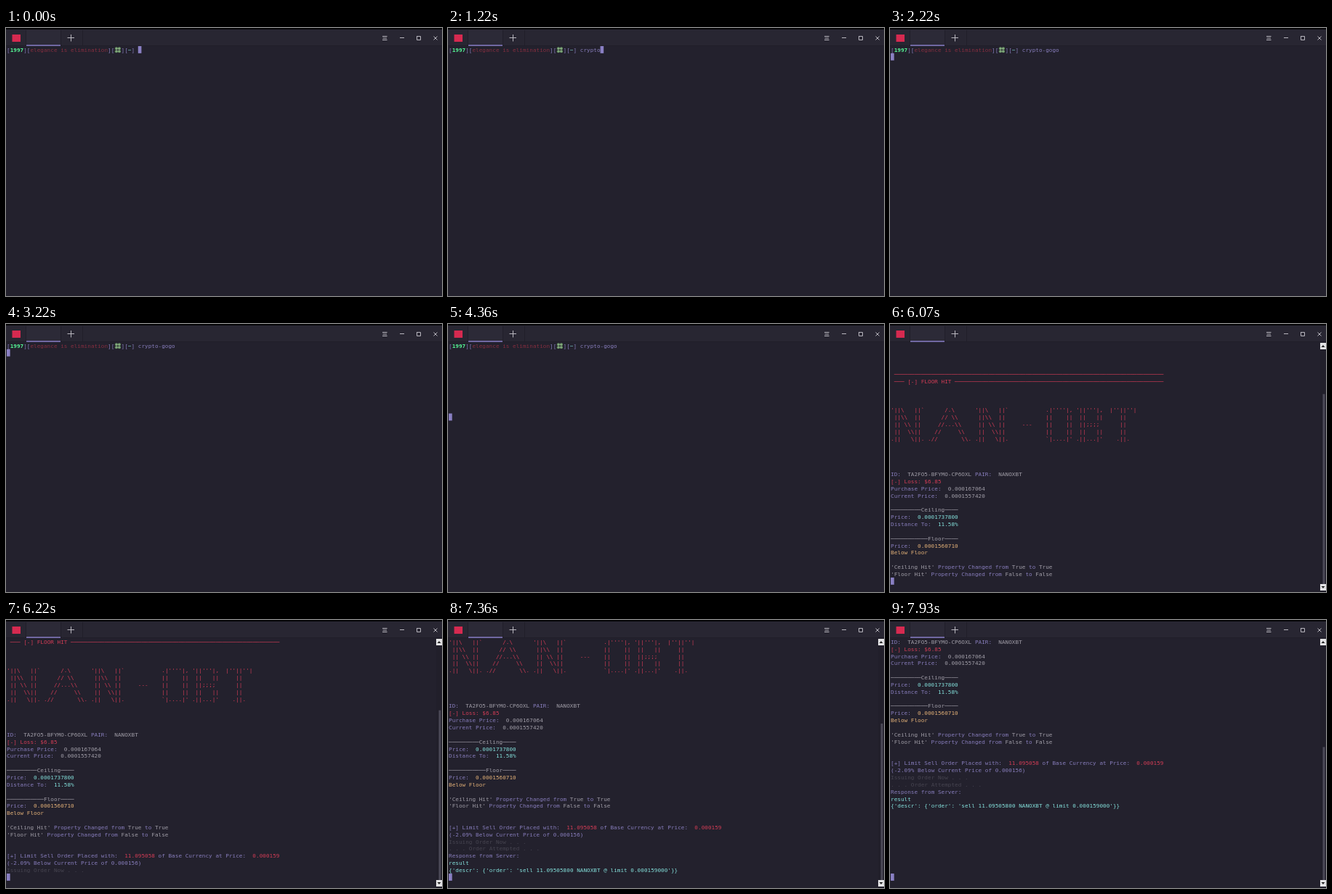
Recreate the animation shown at these times as an HTML page with a canvas. Size 600 by 370 pixels, loop 8 s.

```html
<!DOCTYPE html>
<html lang="en">
<head>
<meta charset="utf-8">
<title>Terminal session</title>
<style>
html, body { margin: 0; width: 100%; height: 100%; overflow: hidden; background: #23212d; }
canvas { display: block; }
</style>
</head>
<body>
<canvas id="stage" width="600" height="370"></canvas>
<script>
const ctx = document.getElementById('stage').getContext('2d');
const LOOP = 8000, CHAR_W = 4.635, LINE_H = 9.85, LEFT = 1, TOP = 25, VISIBLE = 34;
const FONT_SIZE = 7.7, TEXT_SCALE = 0.1;

const purple = '#867cba', grey = '#9f9ca6', red = '#d03c55', cyan = '#83dfda',
      sand = '#e2b077', dim = '#464450', green = '#55f595', maroon = '#842e3f',
      cursorColor = '#8a80c4';

const COMMAND = 'crypto-gogo', PROMPT_COLS = 39;
const prompt = [purple, '[', green, '1997', purple, '][', maroon, 'elegance is elimination',
                purple, '][  ][', cyan, '~', purple, '] '];
const rule = n => '─'.repeat(n);

// Each line alternates colour and text, keyed by terminal row.
const lines = {
  12: [red, ' ' + rule(80)],
  13: [red, ' ─── [-] FLOOR HIT ' + rule(62)],
  17: [red, "'||\\   ||`      /.\\      '||\\   ||`           .|''''|, '||'''|,  |''||''|"],
  18: [red, " ||\\\\  ||      // \\\\      ||\\\\  ||            ||    ||  ||   ||     ||"],
  19: [red, " || \\\\ ||     //...\\\\     || \\\\ ||     ---    ||    ||  ||;;;;      ||"],
  20: [red, " ||  \\\\||    //     \\\\    ||  \\\\||            ||    ||  ||   ||     ||"],
  21: [red, ".||   \\||. .//       \\\\. .||   \\||.           `|....|' .||...|'    .||."],
  26: [purple, 'ID:  ', grey, 'TA2FO5-BFYMO-CP6OXL ', purple, 'PAIR:  ', grey, 'NANOXBT'],
  27: [red, '[-] Loss: $6.85'],
  28: [purple, 'Purchase Price:  ', grey, '0.000167064'],
  29: [purple, 'Current Price:  ', grey, '0.0001557420'],
  31: [grey, rule(9) + 'Ceiling' + rule(4)],
  32: [purple, 'Price:  ', cyan, '0.0001737800'],
  33: [purple, 'Distance To:  ', cyan, '11.58%'],
  35: [grey, rule(11) + 'Floor' + rule(4)],
  36: [purple, 'Price:  ', sand, '0.0001560710'],
  37: [sand, 'Below Floor'],
  39: [grey, "'Ceiling Hit' ", purple, 'Property Changed from ', grey, 'True ', purple, 'to ', grey, 'True'],
  40: [grey, "'Floor Hit' ", purple, 'Property Changed from ', grey, 'False ', purple, 'to ', grey, 'False'],
  43: [purple, '[+] Limit Sell Order Placed with:  ', red, '11.095058',
       purple, ' of Base Currency at Price:  ', red, '0.000159'],
  44: [purple, '(-2.09% Below Current Price of 0.000156)'],
  45: [dim, 'Issuing Order Now . . .'],
  46: [dim, '. . . Order Attempted . . .'],
  47: [purple, 'Response from Server:'],
  48: [cyan, 'result'],
  49: [cyan, "{'descr': {'order': 'sell 11.09505800 NANOXBT @ limit 0.000159000'}}"]
};

// Cursor row from each moment on; every line above it has been printed.
const output = [[0, 0], [2220, 1], [4220, 10], [4930, 27], [5790, 41], [6210, 46], [6500, 50], [7930, 59]];

const colX = col => LEFT + col * CHAR_W;
const rowY = row => TOP + row * LINE_H;

function box(color, x, y, w, h) {
  ctx.fillStyle = color;
  ctx.fillRect(x, y, w, h);
}

function stroke(color, width, ...paths) {
  ctx.strokeStyle = color;
  ctx.lineWidth = width;
  ctx.beginPath();
  for (const [x, y, ...rest] of paths) {
    ctx.moveTo(x, y);
    for (let i = 0; i < rest.length; i += 2) ctx.lineTo(rest[i], rest[i + 1]);
  }
  ctx.stroke();
}

// Large type scaled down keeps the column advance exact.
function drawLine(parts, row) {
  let col = 0;
  for (let i = 0; i < parts.length; i += 2) {
    const [color, text] = [parts[i], parts[i + 1]];
    ctx.save();
    ctx.translate(colX(col), rowY(row) + 7.8);
    ctx.scale(TEXT_SCALE, TEXT_SCALE);
    ctx.font = `${color === green ? 'bold ' : ''}${FONT_SIZE / TEXT_SCALE}px "DejaVu Sans Mono", monospace`;
    ctx.fillStyle = color;
    ctx.fillText(text, 0, 0);
    ctx.restore();
    col += text.length;
  }
}

function drawClover(x, y) {
  for (const [dx, dy] of [[-2, -2], [2, -2], [-2, 2], [2, 2]]) {
    ctx.fillStyle = '#6f9a6c';
    ctx.beginPath();
    ctx.arc(x + dx, y + dy, 2, 0, 7);
    ctx.fill();
    box('#b9c9a8', x + dx * 0.8 - 0.5, y + dy * 0.8 - 0.5, 1, 1);
  }
}

function drawTitleBar() {
  box('#282632', 0, 0, 600, 24);
  box('#050507', 0, 0, 600, 2);
  box('#201e29', 0, 24, 600, 1);
  box('#2c2a37', 28, 3, 47, 20);
  for (const x of [27.5, 75.5, 105.5]) stroke('#211f2a', 1, [x, 3, x, 24]);
  box('#7068a2', 28, 23, 47, 2);
  box('#d62a50', 8.5, 9, 11.5, 10);
  const icon = '#b9b7bf';
  stroke(icon, 1, [84.5, 13.5, 94, 13.5], [89.5, 9, 89.5, 18.5],
    [518, 11.5, 524.5, 11.5], [518.5, 14, 524, 14], [518, 16.5, 524.5, 16.5],
    [542, 13.5, 548, 13.5],
    [565.5, 11.5, 570.5, 11.5, 570.5, 16.5, 565.5, 16.5, 565.5, 11],
    [588.5, 11.5, 593.5, 16.5], [593.5, 11.5, 588.5, 16.5]);
}

function drawScrollbar(scroll) {
  box('#211f2a', 592, 25, 8, 344);
  const start = 35, end = 359;
  const thumb = start + (end - start) * scroll / (scroll + VISIBLE);
  box('#4b4957', 595.5, thumb, 3, end - thumb);
  for (const [y, dir] of [[26, 1], [359, -1]]) {
    box('#e4e4e6', 592, y, 8, 9);
    const mid = y + 4.5;
    ctx.fillStyle = '#222';
    ctx.beginPath();
    ctx.moveTo(593.5, mid + dir * 1.5);
    ctx.lineTo(598.5, mid + dir * 1.5);
    ctx.lineTo(596, mid - dir * 1.5);
    ctx.fill();
  }
}

function draw(t) {
  const cursorRow = output.filter(([at]) => t >= at).pop()[1];
  const scroll = Math.max(0, cursorRow - VISIBLE + 1);
  const typed = t < 500 ? 0 : Math.min(COMMAND.length, Math.floor((t - 500) / 142.8) + 1);

  box('#23212d', 0, 0, 600, 370);
  drawTitleBar();
  if (scroll === 0) {
    drawLine([...prompt, purple, COMMAND.slice(0, typed)], 0);
    drawClover(colX(33), rowY(0) + 5.2);
  }
  for (const [row, parts] of Object.entries(lines)) {
    if (row >= scroll && row < cursorRow) drawLine(parts, row - scroll);
  }
  const cursorCol = cursorRow === 0 ? PROMPT_COLS + typed : 0;
  box(cursorColor, colX(cursorCol), rowY(cursorRow - scroll), CHAR_W, LINE_H);
  if (scroll > 0) drawScrollbar(scroll);
}

const began = performance.now();
function tick() {
  draw((performance.now() - began) % LOOP);
  requestAnimationFrame(tick);
}
tick();
</script>
</body>
</html>
```
